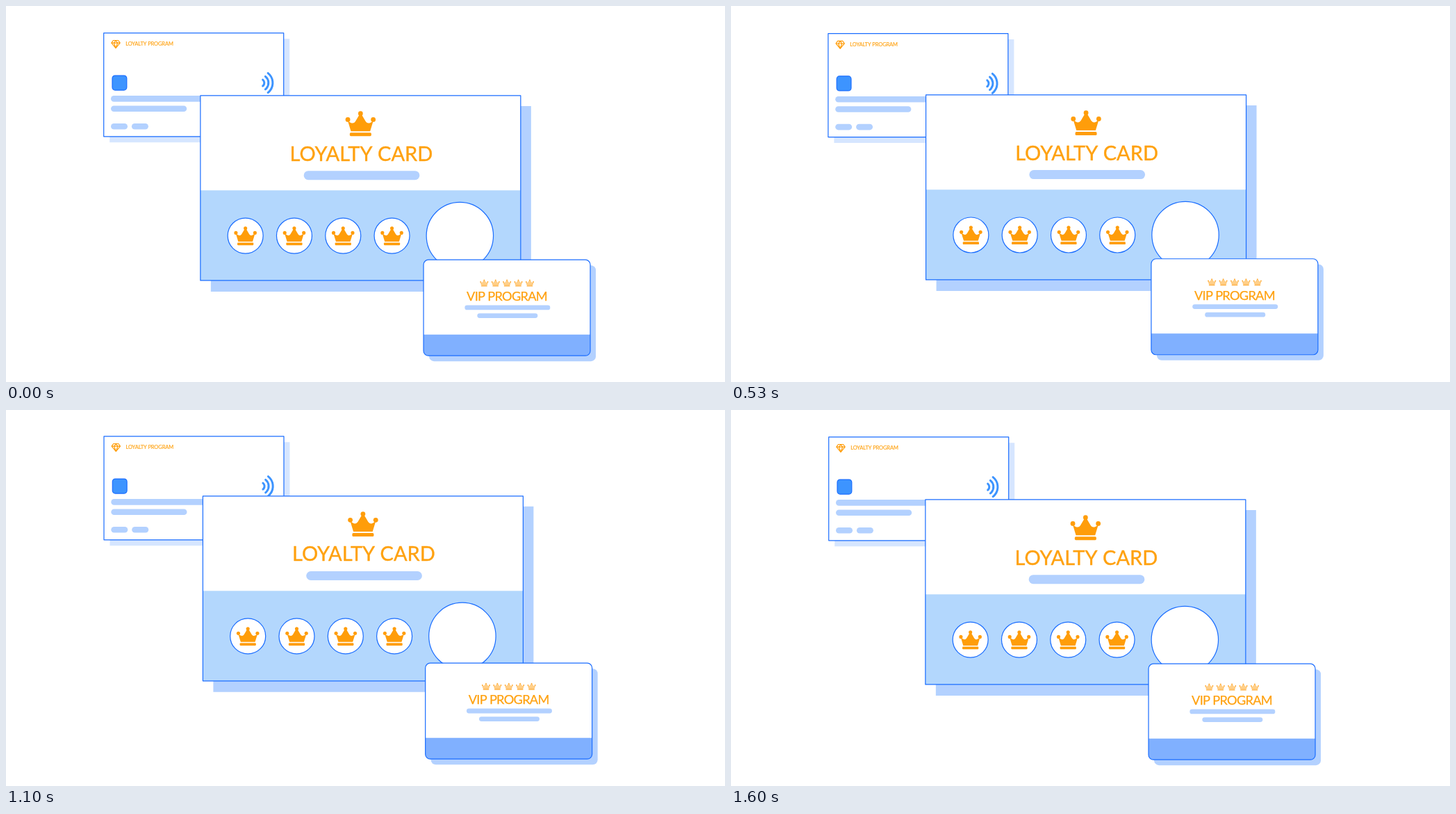
An HTML page with a canvas that plays this animation: 1035 by 541 pixels, repeating every 1630 ms.

```html
<!DOCTYPE html>
<html lang="en">
<head>
<meta charset="utf-8">
<title>Loyalty cards</title>
<style>
  html, body { margin: 0; width: 100%; height: 100%; overflow: hidden; background: #fff; }
  canvas { display: block; width: 1035px; height: 541px; }
</style>
</head>
<body>
<canvas id="stage" width="1035" height="541"></canvas>
<script>
const ctx = document.getElementById('stage').getContext('2d');
const LINE = '#1a6dff', PALE = '#b3d1ff', GOLD = '#ff9d0a', TEXT = '#ffa10f';
const LOOP = 1630, STEPS = 48, TAU = Math.PI * 2;

function paint(fill, stroke, width = 1.2) {
  if (fill) { ctx.fillStyle = fill; ctx.fill(); }
  if (stroke) { ctx.strokeStyle = stroke; ctx.lineWidth = width; ctx.stroke(); }
}

function box(x, y, w, h, r, fill, stroke) {
  ctx.beginPath();
  ctx.roundRect(x, y, w, h, r);
  paint(fill, stroke);
}

const bar = (x, y, w, h) => box(x, y, w, h, h / 2, PALE);

function disc(x, y, r, fill, stroke) {
  ctx.beginPath();
  ctx.arc(x, y, r, 0, TAU);
  paint(fill, stroke);
}

function label(str, x, y, size, spacing, align, weight) {
  ctx.font = `400 ${size}px Lato, sans-serif`;
  ctx.letterSpacing = spacing + 'px';
  ctx.textAlign = align;
  ctx.fillStyle = ctx.strokeStyle = TEXT;
  ctx.lineWidth = weight;
  ctx.fillText(str, x, y);
  ctx.strokeText(str, x, y);
}

// Crown centred on (x, y), 43 by 36 units before scaling
function crown(x, y, scale, light) {
  const fill = light ? '#ffd08a' : GOLD;
  const edge = light ? '#ffae3d' : null;
  ctx.save();
  ctx.translate(x, y);
  ctx.scale(scale, scale);
  ctx.beginPath();
  ctx.moveTo(-18.5, -4.5);
  ctx.quadraticCurveTo(-11, 2.5, -7.5, -3);
  ctx.lineTo(-1.6, -13);
  ctx.lineTo(1.6, -13);
  ctx.lineTo(7.5, -3);
  ctx.quadraticCurveTo(11, 2.5, 18.5, -4.5);
  ctx.lineTo(13.8, 11);
  ctx.lineTo(-13.8, 11);
  ctx.closePath();
  paint(fill, edge, 2);
  for (const [bx, by] of [[-18.3, -5.7], [0, -14.4], [18.3, -5.7]]) disc(bx, by, 3.4, light ? edge : fill);
  box(-15.5, 13, 31, 5, 1.6, light ? edge : fill);
  ctx.restore();
}

function gem(x, y) {
  ctx.beginPath();
  ctx.moveTo(x - 3.6, y - 5.5);
  ctx.lineTo(x + 3.6, y - 5.5);
  ctx.lineTo(x + 6.2, y - 1.8);
  ctx.lineTo(x, y + 5.7);
  ctx.lineTo(x - 6.2, y - 1.8);
  ctx.closePath();
  ctx.moveTo(x - 6.2, y - 1.8);
  ctx.lineTo(x + 6.2, y - 1.8);
  ctx.moveTo(x, y - 5.5);
  ctx.lineTo(x - 2.6, y - 1.8);
  ctx.lineTo(x, y + 5.7);
  ctx.lineTo(x + 2.6, y - 1.8);
  ctx.closePath();
  paint(null, GOLD, 1.2);
}

function programCard() {
  box(8.5, 8.5, 259, 149, 0, '#d6e6ff');
  box(0, 0, 259, 149, 0, '#fff', LINE);
  gem(17.3, 16.2);
  label('LOYALTY PROGRAM', 31.5, 18.6, 7.5, -0.1, 'left', 0.15);
  box(12.3, 61.3, 20.8, 21, 4, '#3d94ff', LINE);
  ctx.lineCap = 'round';
  for (const r of [5.8, 11.8, 17.9]) {
    ctx.beginPath();
    ctx.arc(225.3, 71.8, r, -0.9, 0.9);
    paint(null, '#3d94ff', 3);
  }
  bar(10.3, 90.3, 150, 8.6);
  bar(10.3, 104.6, 109.2, 8.6);
  bar(10.3, 130.2, 24, 8.6);
  bar(40.2, 130.2, 24, 8.6);
}

function stampCard() {
  box(15, 15, 461, 267, 0, PALE);
  box(0, 0, 461, 266, 0, '#fff');
  box(0, 136.4, 461, 129.6, 0, '#b3d7fd');
  box(0, 0, 461, 266, 0, null, LINE);
  crown(230.5, 40.2, 1);
  label('LOYALTY CARD', 231.5, 93.6, 29, 0, 'center', 0.4);
  bar(148.8, 108.2, 166.7, 13);
  for (let i = 0; i < 4; i++) {
    const x = 64.8 + i * 70.3;
    disc(x, 201.6, 25.5, '#fff', LINE);
    crown(x, 201.7, 0.75);
  }
  disc(373.5, 201.6, 48.2, '#fff', LINE);
}

function vipCard() {
  box(8, 8, 240, 138, 7, PALE);
  box(0, 0, 240, 138, 7, '#fff');
  box(0, 107.6, 240, 30.4, [0, 0, 7, 7], '#80b0ff');
  box(0, 0, 240, 138, 7, null, LINE);
  for (let i = 0; i < 5; i++) crown(87.3 + i * 16.4, 33.4, 0.28, true);
  label('VIP PROGRAM', 120, 58.9, 18.2, -0.7, 'center', 0.25);
  bar(59.3, 65.4, 123, 6.8);
  bar(77.3, 77, 87, 6.8);
}

const wave = (p, peak) => Math.cos(TAU * (p - peak));

// 0 at phase a, 1 at phase b, back to 0 at a + 1, eased by a sine
function swing(p, a, b) {
  const q = (p - a + 1) % 1, rise = b - a;
  const k = q < rise ? q / rise : (1 - q) / (1 - rise);
  return (1 - Math.cos(Math.PI * k)) / 2;
}

function place(draw, x, y) {
  ctx.save();
  ctx.translate(x, y);
  draw();
  ctx.restore();
}

function render(ms) {
  // 30 steps a second, on a 10 ms clock
  const tick = Math.floor((ms % LOOP) / 10) * 10;
  const p = Math.floor((tick + 9) * 0.03) / STEPS;

  ctx.fillStyle = '#fff';
  ctx.fillRect(0, 0, 1035, 541);
  ctx.lineJoin = 'round';

  place(programCard, 140.5 - 0.65 * wave(p, 0.3), 38.75 + wave(p, 0.24));

  const lift = swing(p, 0.106, 0.694);
  place(stampCard, 279.2 + 4.2 * lift, 129.9 - 6.1 * lift);

  const drift = 2.2 * wave(p, 0.45) - 0.2 * wave(2 * p, 0.9);
  place(vipCard, 603.3 + drift, 364.35 - 0.36 * drift);
}

function loop() {
  render(performance.now());
  requestAnimationFrame(loop);
}
loop();
</script>
</body>
</html>
```
